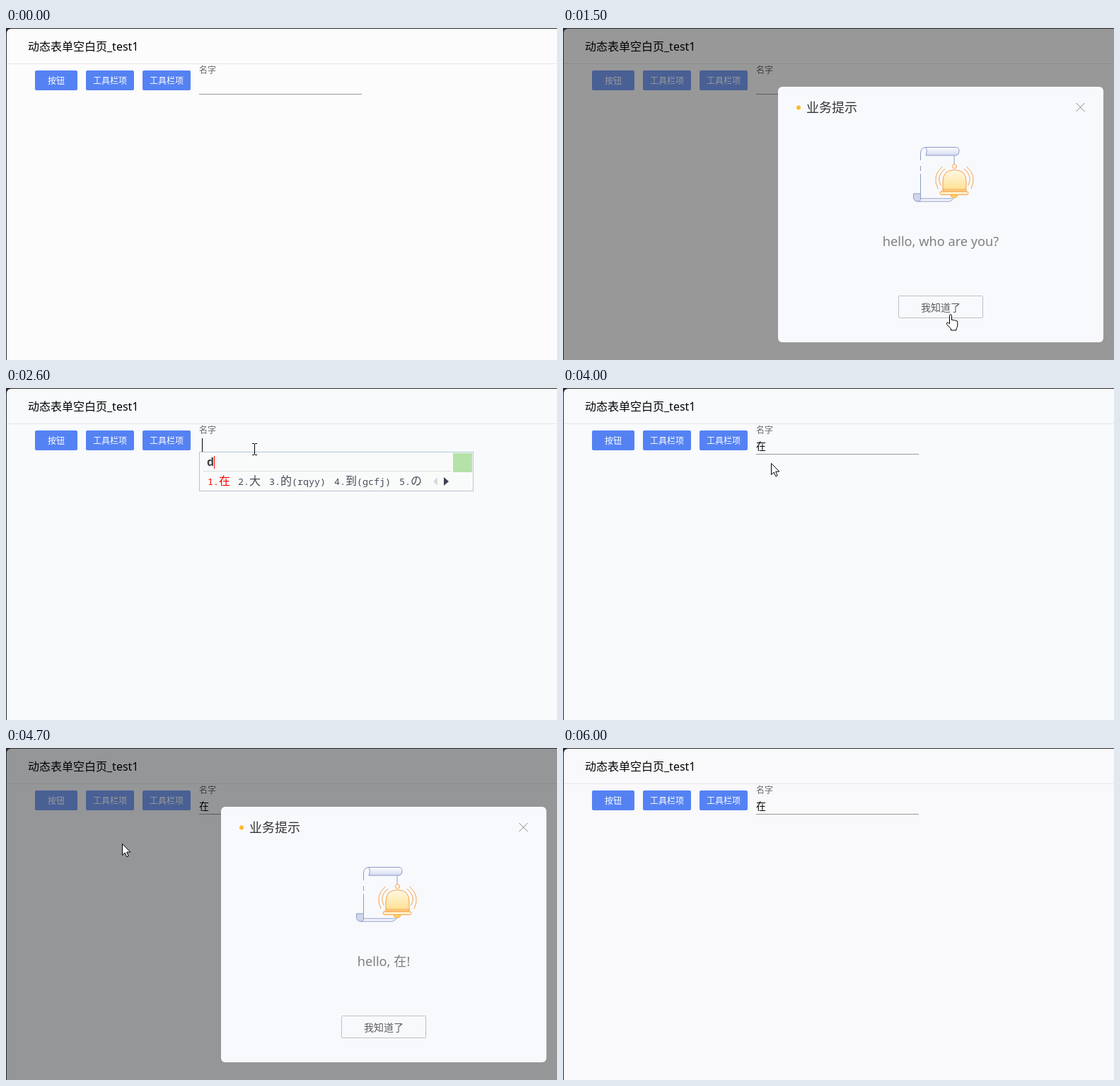
An HTML page that plays this animation: 779 px wide and 469 px high, repeating every 6100 ms.

```html
<!DOCTYPE html>
<html lang="zh-CN">
<head>
<meta charset="utf-8">
<title>Dialog demo</title>
<style>
  html, body { margin: 0; width: 100%; height: 100%; overflow: hidden; background: #2b2b2b; }
  svg { display: block; font-family: "Noto Sans", "Noto Sans CJK SC", "Noto Sans CJK JP", "Noto Sans CJK", sans-serif; }
  text { white-space: pre; }
  .mid { text-anchor: middle; }
  #buttons rect { fill: #5582f3; }
  #buttons.dim rect { fill: #7a9ff8; }
  #buttons text { fill: #fff; font-size: 12px; text-anchor: middle; }
  #words text { font: 13.33px "Noto Sans Mono", "Liberation Mono", monospace; fill: #4a4a58; }
  #words tspan { font: 16px "Noto Sans CJK SC", "Noto Sans CJK JP", "Noto Sans CJK", sans-serif; }
  #words text:first-child { fill: #f00; }
  #scroll { fill: none; stroke: #8d9bc7; }
  #bell { fill: none; stroke: #f5a04c; stroke-linecap: round; }
</style>
</head>
<body>
<svg width="779" height="469" viewBox="0 0 779 469">
  <defs>
    <linearGradient id="gold" x2="0" y2="1">
      <stop stop-color="#fff8e4"/><stop offset="1" stop-color="#fddf8e"/>
    </linearGradient>
    <linearGradient id="paper" x2="0" y2="1">
      <stop stop-color="#fff"/><stop offset="1" stop-color="#d3daf0"/>
    </linearGradient>
  </defs>

  <path id="page" d="M1 469V8Q1 1 8 1H779V469Z"/>
  <path d="M1 50.5H779" stroke="#e7e7e9"/>
  <text x="31" y="32" font-size="16">动态表单空白页_test1</text>
  <g id="buttons">
    <rect x="41" y="60" width="60" height="28" rx="2"/><text x="71" y="79">按钮</text>
    <rect x="113" y="60" width="68" height="28" rx="2"/><text x="147" y="79">工具栏项</text>
    <rect x="193" y="60" width="68" height="28" rx="2"/><text x="227" y="79">工具栏项</text>
  </g>
  <text x="273" y="64" font-size="12" fill="#666">名字</text>
  <path d="M273 93.5H503" stroke="#999"/>
  <text id="value" x="273" y="87" font-size="14">在</text>
  <path id="caret" d="M.5 71V90" stroke="#000"/>

  <g id="ime">
    <rect x="273.5" y="90.5" width="387" height="55" fill="#f9fbfb" stroke="#b3c5d3"/>
    <path d="M279 117.5H629" stroke="#d8dde0"/>
    <text x="284" y="110" font-size="16" font-weight="700" fill="#444">d</text>
    <path d="M294.5 96V114" stroke="#f00"/>
    <g id="words">
      <text x="285" y="137">1.<tspan>在</tspan></text>
      <text x="328" y="137">2.<tspan>大</tspan></text>
      <text x="372" y="137">3.<tspan>的</tspan>(rqyy)</text>
      <text x="464" y="137">4.<tspan>到</tspan>(gcfj)</text>
      <text x="556" y="137">5.<tspan>の</tspan></text>
    </g>
    <path d="M610 126V138L604 132Z" fill="#d5d8dc"/>
    <path d="M619 126V138L626 132Z" fill="#3c4254"/>
    <rect x="632" y="92" width="27" height="27" fill="#b5e2a8"/>
  </g>

  <path id="shade" d="M1 469V8Q1 1 8 1H779V469Z" fill-opacity=".4"/>

  <g id="dialog">
    <rect x="304" y="83" width="460" height="361" rx="6" fill="#f8f9fc"/>
    <circle cx="333" cy="112.5" r="3" fill="#fdb92c"/>
    <text x="344" y="119" font-size="18" fill="#333">业务提示</text>
    <path d="M725.5 106L737.5 118M737.5 106L725.5 118" stroke="#888"/>
    <g id="scroll">
      <path d="M505.5 187V176Q506 169 513 168.5M505.5 195V202M505.5 206V235M553 180V192"/>
      <path d="M513 168.5H556Q560 169 560 174T556 180H513Q516 174 513 168.5Z" fill="url(#paper)"/>
      <path d="M495.5 234H505.5V240Q506 245 502 245 495.5 245 495.5 239Z" fill="#cfd6ec"/>
      <path d="M505.5 241H550M502 245H546Q551 244 553 239"/>
    </g>
    <g id="bell">
      <path d="M548 236Q549 240 553 240T558 236Z" fill="#ffd55c"/>
      <path d="M537 230V217Q537 200.5 553.5 200.5T570 217V230Z" fill="url(#gold)"/>
      <rect x="533" y="231" width="40" height="4.5" rx="2" fill="#fff0c8"/>
      <path d="M537 228H570"/>
      <circle cx="553.5" cy="195.5" r="3" fill="#fff8e4"/>
      <path d="M540 199Q527 209 534 222M536 196Q521 209 530 227M567 199Q580 209 573 222M571 196Q586 209 577 227"/>
    </g>
    <text id="message" class="mid" x="534" y="308" font-size="18.2" fill="#808080"></text>
    <rect x="474.5" y="378.5" width="119" height="31" rx="1" fill="none" stroke="#bfbfc4"/>
    <text class="mid" x="534" y="400" font-size="14" fill="#5c5c5c">我知道了</text>
  </g>

  <path id="cursor"/>
</svg>
<script>
const $ = id => document.getElementById(id);
const LOOP = 6100, STEP = 100;

const shapes = {
  arrow: "M.5.5V16.5L4.2 13 6.8 18.8 9.2 17.7 6.7 12H11.8Z",
  hand: "M5.5 14V2.5Q5.5.8 7 .8T8.5 2.5V8.5Q10 7.5 11.3 9 13 8 14.2 9.7 16.5 9 16.8 11V16Q16.5 19 15 21V23H7.5V21L1.5 14.5Q.8 12.2 2.5 12 4 12 5.5 14",
  beam: "M0 .5H3M4 .5H7M3.5 1V16M0 16.5H3M4 16.5H7"
};

// time, x, y, shape from that time on
const route = [
  [100, 559, 456, "arrow"], [400, 300, 200, "arrow"], [600, 81, 84, "arrow"],
  [700, 81, 80, "arrow"], [900, 81, 80, "arrow"], [1200, 520, 278, "arrow"],
  [1400, 541, 414, "hand"], [1500, 541, 404, "hand"], [1700, 541, 404, "hand"],
  [1800, 520, 350, "arrow"], [2200, 360, 90, "beam"], [2300, 348, 79, "beam"],
  [2400, 348, 78, "beam"], [2900, 348, 78, "beam"], [3000, 420, 80, "beam"],
  [3100, 530, 86, "arrow"], [3300, 725, 99, "arrow"], [3400, 725, 99, "arrow"],
  [3600, 767, 128, "arrow"], [3700, 767, 128, "arrow"], [4100, 136, 98, "arrow"],
  [4200, 82, 78, "arrow"], [4600, 82, 78, "arrow"], [5100, 490, 365, "arrow"],
  [5200, 525, 388, "hand"], [5300, 531, 388, "hand"], [5400, 640, 300, "arrow"],
  [5500, 730, 225, "arrow"], [5700, 767, 167, "arrow"], [5800, 790, 150, "arrow"]
];

const popups = [
  { open: 730, close: 1700, text: "hello, who are you?" },
  { open: 4500, close: 5300, text: "hello, 在!" }
];
const FADE_IN = 200, FADE_OUT = 150;

const clamp = v => Math.max(0, Math.min(1, v));
const show = (id, on) => $(id).setAttribute("visibility", on ? "visible" : "hidden");

function drawCursor(t) {
  const i = route.findIndex(p => p[0] > t);
  show("cursor", i > 0);
  if (i < 1) return;
  const [t0, x0, y0, kind] = route[i - 1], [t1, x1, y1] = route[i];
  const k = (t - t0) / (t1 - t0);
  const x = Math.round(x0 + (x1 - x0) * k), y = Math.round(y0 + (y1 - y0) * k);
  const c = $("cursor");
  c.setAttribute("d", shapes[kind]);
  c.setAttribute("fill", kind === "beam" ? "none" : "#fff");
  c.setAttribute("stroke", "#000");
  c.setAttribute("transform", `translate(${x} ${y})`);
}

function drawPopup(t) {
  const p = popups.find(p => t >= p.open && t < p.close + FADE_OUT);
  show("shade", p);
  show("dialog", p);
  $("buttons").classList.toggle("dim", !!p);
  if (!p) return;
  const k = Math.min(clamp((t - p.open) / FADE_IN), clamp(1 - (t - p.close) / FADE_OUT));
  const s = 0.974 + 0.026 * k;
  $("message").textContent = p.text;
  $("dialog").setAttribute("opacity", k);
  $("dialog").setAttribute("transform", `translate(534 263.5) scale(${s}) translate(-534 -263.5)`);
}

function draw(now) {
  const t = Math.floor(now % LOOP / STEP) * STEP;
  $("page").setAttribute("fill", t < 1700 ? "#fcfcfc" : t < 5400 ? "#f8fafc" : "#f9f9fb");
  show("ime", t >= 2600 && t < 2800);
  show("value", t >= 2800);
  show("caret", t >= 2600 && t < 3500);
  $("caret").setAttribute("transform", `translate(${t < 2800 ? 277 : 288} 0)`);
  drawPopup(t);
  drawCursor(t);
}

const start = performance.now();
function tick() {
  draw(performance.now() - start);
  requestAnimationFrame(tick);
}
tick();
</script>
</body>
</html>
```
